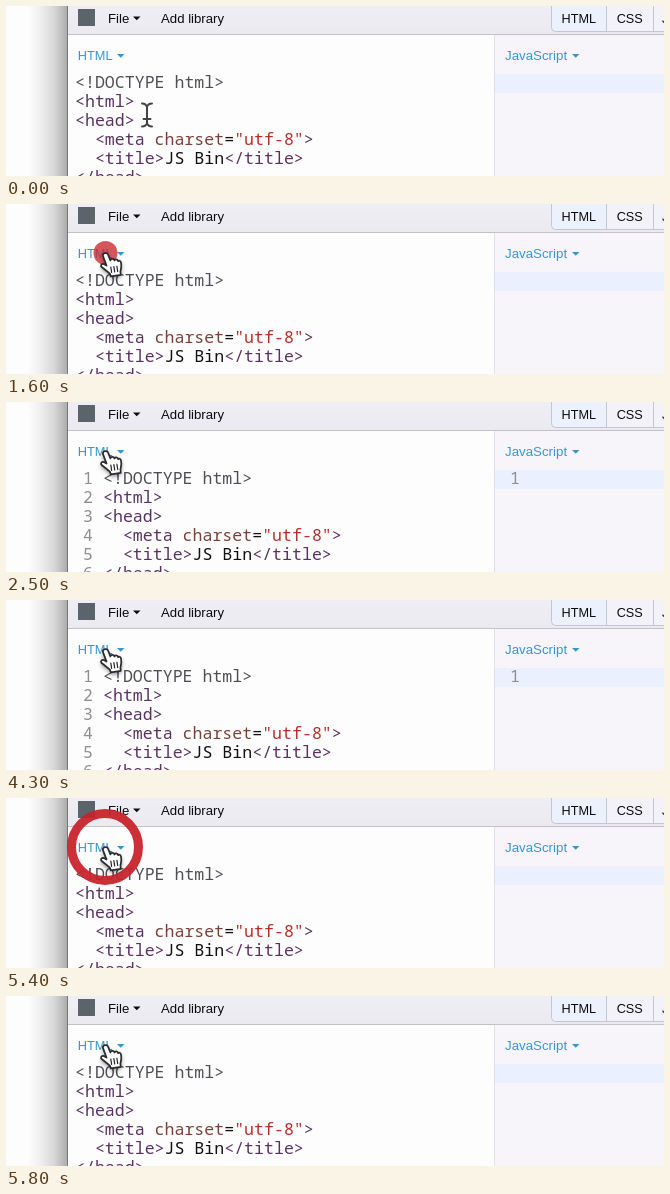
Write an HTML page with a canvas that moves like this. It is 658 px wide and 170 px high and loops after 6300 ms.

```html
<!DOCTYPE html>
<html lang="en">
<head>
<meta charset="utf-8">
<title>Line number toggle</title>
<style>
  html, body { margin: 0; width: 100%; height: 100%; overflow: hidden; background: #fff; }
  canvas { display: block; }
</style>
</head>
<body>
<canvas id="stage" width="658" height="170"></canvas>
<script>
const ctx = document.getElementById('stage').getContext('2d');
const LOOP = 6300, STEP = 100;
const SANS = '"Liberation Sans", Arial, sans-serif';
const MONO = '16.58px "Noto Sans Mono", "DejaVu Sans Mono", monospace';
const LINE = 19, BASE = 82;
const INK = { doc: '#504d54', tag: '#5a3163', attr: '#7a4139', str: '#b62e28', text: '#111114' };
const BLUE = '#3497d3', DARK = '#0c0c0f', RED = '200,34,44';

const CODE = [
  [['doc', '<!DOCTYPE html>']],
  [['tag', '<html>']],
  [['tag', '<head>']],
  [['tag', '  <meta '], ['attr', 'charset'], ['text', '='], ['str', '"utf-8"'], ['tag', '>']],
  [['tag', '  <title>'], ['text', 'JS Bin'], ['tag', '</title>']],
  [['tag', '</head>']]
];

// Pointer hot spots, one per step, joined by a smooth curve
const PATH = [[141, 109], [182, 142], [207, 154], [172, 116], [116, 62],
              [86, 20], [97, 42], [112, 61], [103, 53], [99, 49]];
const CLICKS = [{ down: 1600, up: 2200 }, { down: 5000, up: 5300 }];
const NUMBERS = { on: 2000, off: 5200 };

function rect(x, y, w, h, fill) {
  ctx.fillStyle = fill;
  ctx.fillRect(x, y, w, h);
}

function text(str, x, y, fill, font) {
  ctx.font = font;
  ctx.fillStyle = fill;
  ctx.fillText(str, x, y);
}

function fade(x0, y0, x1, y1, stops) {
  const g = ctx.createLinearGradient(x0, y0, x1, y1);
  stops.forEach(([at, color]) => g.addColorStop(at, color));
  return g;
}

function caret(x, y, fill) {
  ctx.fillStyle = fill;
  ctx.beginPath();
  ctx.moveTo(x, y);
  ctx.lineTo(x + 7.5, y);
  ctx.lineTo(x + 3.75, y + 3.8);
  ctx.fill();
}

function drawTabs() {
  const font = '12.7px ' + SANS;
  ctx.beginPath();
  ctx.roundRect(545.5, -6, 130, 31.5, 4);
  ctx.fillStyle = '#f3f2f8';
  ctx.fill();
  rect(546, 0, 54, 25, '#ebf1fd');
  ctx.lineWidth = 1;
  ctx.strokeStyle = '#c6c6cf';
  ctx.stroke();
  [600, 647].forEach(x => rect(x, 0, 1, 25, '#c6c6cf'));
  text('HTML', 555.5, 16.5, DARK, font);
  text('CSS', 610.7, 16.5, DARK, font);
  text('JavaScript', 656, 16.5, DARK, font);
}

function drawWindow() {
  rect(0, 0, 658, 170, '#fdfdfd');
  rect(0, 0, 62, 170, fade(22, 0, 62, 0,
    [[0, '#fdfdfd'], [0.3, '#f0f0f0'], [0.65, '#d8d8d8'], [1, '#a9a9a9']]));

  rect(62, 0, 596, 28, fade(0, 0, 0, 28, [[0, '#efeef4'], [1, '#ebeaf0']]));
  rect(72, 3, 17, 17, '#5b636b');
  const bar = '13.2px ' + SANS;
  text('File', 102, 16.5, DARK, bar);
  caret(127, 10.5, DARK);
  text('Add library', 155, 16.5, DARK, bar);
  drawTabs();
  rect(62, 28, 596, 1, '#c2c2c8');

  rect(488, 29, 170, 141, '#f7f5f9');
  rect(488, 29, 1, 141, '#e2e0e7');
  rect(489, 68, 169, 19, '#eaf0fe');
  rect(61, 0, 1, 170, '#77777b');

  text('HTML', 71.8, 54, BLUE, '12.8px ' + SANS);
  caret(111, 48, BLUE);
  text('JavaScript', 499, 54, BLUE, '13.3px ' + SANS);
  caret(566, 48, BLUE);
}

function drawCode(numbered) {
  ctx.font = MONO;
  CODE.forEach((line, i) => {
    const y = BASE + i * LINE;
    let x = numbered ? 97 : 69;
    if (numbered) text(i + 1, 77, y, '#8f8f93', MONO);
    for (const [kind, str] of line) {
      text(str, x, y, INK[kind], MONO);
      x += ctx.measureText(str).width;
    }
  });
  if (numbered) text('1', 504, BASE, '#8f8f93', MONO);
}

function drawClick(t) {
  for (const { down, up } of CLICKS) {
    if (t < down || t >= up + 3 * STEP) continue;
    ctx.beginPath();
    if (t < up) {
      const r = 20 - 8 * Math.pow(0.5, (t - down) / STEP);
      ctx.arc(99.5, 49, r, 0, 7);
      ctx.fillStyle = `rgba(${RED},0.76)`;
      ctx.fill();
    } else {
      const k = (t - up) / STEP;
      const outer = 20 + 12.5 * k + 5.5 * k * k;
      ctx.arc(99, 49, outer - 4.5, 0, 7);
      ctx.lineWidth = 9;
      ctx.strokeStyle = `rgba(${RED},${k < 2 ? 0.94 : 0.35})`;
      ctx.stroke();
    }
  }
}

function pointerAt(t) {
  const last = PATH.length - 1;
  const s = Math.min(t / STEP, last);
  const i = Math.min(Math.floor(s), last - 1), f = s - i;
  const p = n => PATH[Math.max(0, Math.min(last, n))];
  return [0, 1].map(c => {
    const [a, b, d, e] = [p(i - 1)[c], p(i)[c], p(i + 1)[c], p(i + 2)[c]];
    return b + 0.5 * f * (d - a + f * (2 * a - 5 * b + 4 * d - e + f * (3 * (b - d) + e - a)));
  });
}

const BEAM = new Path2D('M-5 -11.5 Q-1 -11.5 0 -8 Q1 -11.5 5 -11.5 M0 -8 V8 ' +
  'M-5 11.5 Q-1 11.5 0 8 Q1 11.5 5 11.5 M-3.5 4 H3.5');
const HAND = new Path2D('M-2.6 2.6 C-2.6 -.6 2.6 -.6 3 2.4 L4.4 8.4 C5 6.6 8.2 6.8 8.6 9.2 ' +
  'C9.4 7.6 12 8.2 12.2 10.4 C13.2 9.4 15 10.2 15 12.4 C15.3 17 13.8 19 13 21.5 L12.8 25 ' +
  'H2.4 L1.8 22 C-.4 19.5 -2.6 17 -5.4 14.2 C-7.4 11.6 -4.2 9.6 -2 11.8 L-.4 13.2 Z');
const FOLDS = new Path2D('M3.8 15.5 V21 M7 15.5 V21 M10.2 15.5 V21');

function drawPointer(t) {
  const [x, y] = pointerAt(t);
  ctx.save();
  ctx.translate(x, y);
  ctx.lineJoin = ctx.lineCap = 'round';
  if (t < 4 * STEP) {
    ctx.lineWidth = 4;
    ctx.strokeStyle = 'rgba(255,255,255,0.85)';
    ctx.stroke(BEAM);
    ctx.lineWidth = 2;
    ctx.strokeStyle = '#444447';
    ctx.stroke(BEAM);
  } else {
    ctx.rotate(-0.15);
    ctx.scale(0.96, 0.96);
    ctx.shadowColor = 'rgba(0,0,0,0.5)';
    ctx.shadowBlur = 4;
    ctx.shadowOffsetY = 2;
    ctx.fillStyle = '#fff';
    ctx.fill(HAND);
    ctx.shadowColor = 'transparent';
    ctx.lineWidth = 1.8;
    ctx.strokeStyle = '#2b2b2e';
    ctx.stroke(HAND);
    ctx.lineWidth = 1.3;
    ctx.stroke(FOLDS);
  }
  ctx.restore();
}

function frame(now) {
  const t = Math.floor((now % LOOP) / STEP) * STEP;
  drawWindow();
  drawCode(t >= NUMBERS.on && t < NUMBERS.off);
  drawClick(t);
  drawPointer(t);
}

const start = performance.now();
function tick() {
  frame(performance.now() - start);
  requestAnimationFrame(tick);
}
tick();
</script>
</body>
</html>
```
